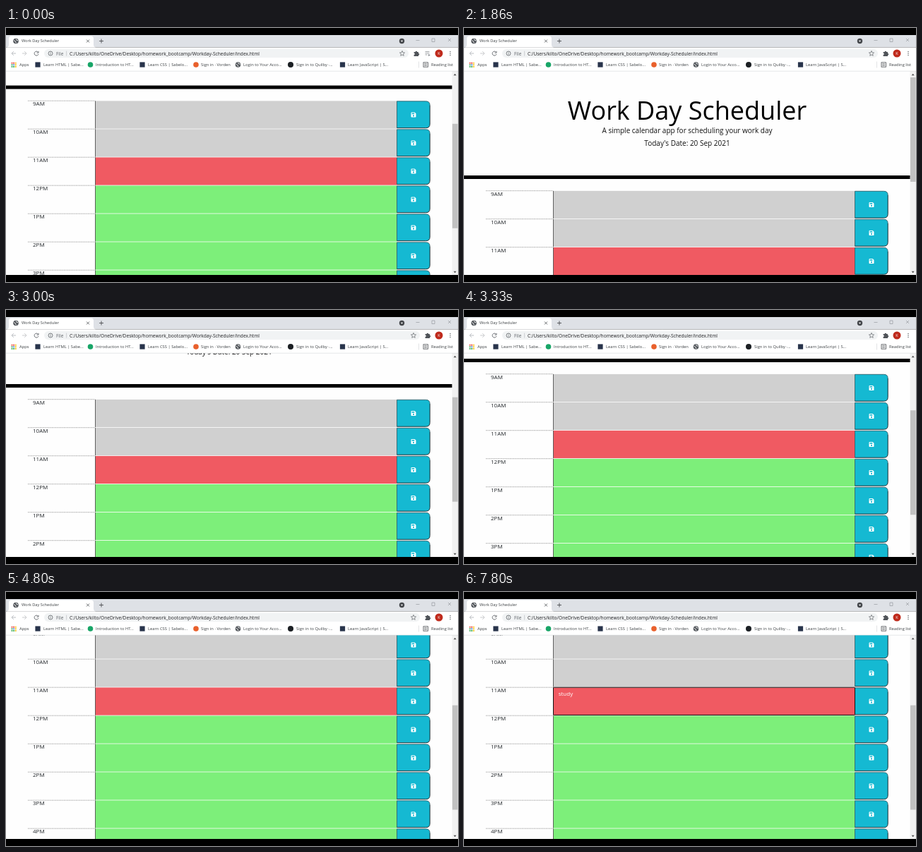
An HTML page that plays this animation: 640 by 360 pixels, repeating every 8 s.

```html
<!DOCTYPE html>
<html lang="en">
<head>
<meta charset="utf-8">
<title>Work Day Scheduler</title>
<style>
  html, body { margin: 0; width: 100%; height: 100%; overflow: hidden; background: #000; }
  svg { display: block; width: 640px; height: 360px; font-family: "Open Sans", "Noto Sans", sans-serif; }
  text { white-space: pre; }
</style>
</head>
<body>
<svg id="stage" viewBox="0 0 640 360"></svg>
<script>
const LOOP = 8000;
const FIRST_ROW = 230.5, ROW = 40;
const HOURS = ['9AM', '10AM', '11AM', '12PM', '1PM', '2PM', '3PM', '4PM', '5PM'];
const CURRENT = 2;

// [start ms, value], each held until the next
const SCROLL = [
  [0, 127.5], [530, 123], [730, 117], [830, 109], [930, 101.5], [1130, 74], [1260, 48],
  [1530, 16], [1600, 0], [2330, 14], [2430, 34], [2530, 52], [2800, 74], [2860, 90],
  [3000, 104], [3060, 108], [3260, 124], [3330, 140], [3400, 153], [3730, 166],
  [3800, 173], [4060, 174.5], [4130, 175.5]
];
const TYPED = [[0, ''], [5800, 's'], [6000, 'st'], [6400, 'stu'], [6800, 'stud'], [7000, 'study']];
const CARET = [[0, 0], [5000, 1], [5600, 0], [5800, 1], [7460, 0]];
const FOCUS = [[0, 0], [5000, 1]];
const MEDIA = [[0, 1], [1860, 0]];
const MEDIA_WIDTH = 16;

const stage = document.getElementById('stage');

function add(parent, tag, attrs = {}, content) {
  const node = document.createElementNS('http://www.w3.org/2000/svg', tag);
  for (const key in attrs) node.setAttribute(key, attrs[key]);
  if (content !== undefined) node.textContent = content;
  return parent.appendChild(node);
}
const rect = (p, x, y, width, height, fill, more) => add(p, 'rect', { x, y, width, height, fill, ...more });
const disc = (p, cx, cy, r, fill, more) => add(p, 'circle', { cx, cy, r, fill, ...more });
const line = (p, d, stroke = '#5f6368', width = 0.9, more) =>
  add(p, 'path', { d, stroke, 'stroke-width': width, fill: 'none', ...more });
const label = (p, x, y, size, str, fill = '#212529', more) =>
  add(p, 'text', { x, y, 'font-size': size, fill, ...more }, str);

function globe(p, x, y) {
  disc(p, x, y, 3.8, '#55595e');
  line(p, `M${x - 2.8} ${y - 1}l2 1.4l1.2 2.4M${x + 0.2} ${y - 3}l.6 1.6l2.2 .6`, '#fff', 0.9);
}

function disk(p, x, y) {
  add(p, 'path', {
    d: `M${x - 3.5} ${y - 2.7}q0-.8 .8-.8h4.4l1.8 1.8v4.4q0 .8-.8 .8h-5.4q-.8 0-.8-.8z`, fill: '#fff'
  });
  rect(p, x - 2.4, y - 2.5, 3.7, 1.7, '#15b9d2');
  disc(p, x, y + 1.4, 1.1, '#15b9d2');
}

function buildRow(page, hour, i) {
  const g = add(page, 'g', { transform: `translate(0 ${FIRST_ROW + i * ROW})` });
  const fill = i < CURRENT ? '#d0d0d0' : i === CURRENT ? '#f05a62' : '#7def7a';
  line(g, 'M31 0.2H126', '#777', 0.7, { 'stroke-dasharray': '1 0.7' });
  label(g, 38, 7.4, 8, hour);
  rect(g, 126, 0.4, 427.5, 39.2, fill);
  line(g, 'M126.5 0.4V39.6', '#555', 0.9);
  add(g, 'path', {
    d: 'M553.5 0.8H594.5Q600.2 .8 600.2 6.5V33Q600.2 38.7 594.5 38.7H553.5Z', fill: '#15b9d2'
  });
  line(g, 'M553.5 38.7V0.8H594.5Q600.2 .8 600.2 6.5', '#2b555d', 0.8);
  line(g, 'M600.2 6.5V33Q600.2 38.7 594.5 38.7H553.5', '#1c2a2d', 0.95);
  disk(g, 577, 20);
  return g;
}

function buildPage() {
  rect(stage, 0, 61, 640, 289, '#fefefe');
  const page = add(stage, 'g');
  const mid = { 'text-anchor': 'middle' };
  label(page, 316, 129.5, 36, 'Work Day Scheduler', '#000', mid);
  label(page, 316, 149.4, 10, 'A simple calendar app for scheduling your work day', '#111', mid);
  label(page, 316, 167, 10, "Today's Date: 20 Sep 2021", '#111', mid);
  rect(page, 0, 209, 632, 5, '#000');
  const rows = HOURS.map((hour, i) => buildRow(page, hour, i));
  const now = rows[CURRENT];
  const focus = rect(now, 126.5, 0.2, 427, 39.2, 'none', { stroke: '#111', 'stroke-width': 1, rx: 0.8 });
  const entry = label(now, 133.7, 12.2, 8, '', '#fff');
  const caret = rect(now, 134, 5.2, 0.6, 8.5, '#fff');
  return { page, focus, entry, caret };
}

function buildScrollbar() {
  rect(stage, 631.5, 61, 8.5, 289, '#f1f1f1');
  const thumb = rect(stage, 632, 70, 7.5, 148, '#c1c1c1');
  add(stage, 'path', { d: 'M633.7 67.2h4l-2-2.4zM633.7 344.8h4l-2 2.4z', fill: '#505050' });
  return thumb;
}

function buildTabs() {
  rect(stage, 0, 10, 640, 17.5, '#dee1e6');
  add(stage, 'path', { d: 'M0 27.5Q4 27.5 4 23.5V15Q4 11.5 7.5 11.5H120.5Q124 11.5 124 15V23.5Q124 27.5 128 27.5Z', fill: '#fff' });
  globe(stage, 14, 18.5);
  label(stage, 22, 20.4, 5.65, 'Work Day Scheduler', '#3c4043');
  line(stage, 'M114 16.5l4 4m0-4l-4 4', '#4a4d51', 0.8);
  line(stage, 'M132 18.5h6m-3-3v6', '#4a4d51');
  disc(stage, 560.5, 18.5, 3.7, '#45484c');
  add(stage, 'path', { d: 'M558.8 17.7h3.4l-1.7 2z', fill: '#fff' });
  line(stage, 'M580.5 17.5h5M603 15h4v4.5h-4zM626 15l4 4m0-4l-4 4', '#8c8f94', 0.6);
}

function buildToolbar() {
  rect(stage, 0, 27.5, 640, 17.5, '#fff');
  line(stage, 'M14 36H8m2.8-2.8L8 36l2.8 2.8', '#b4b7bb');
  line(stage, 'M23 36h6m-2.8-2.8L29 36l-2.8 2.8', '#c3c5c8');
  line(stage, 'M45.3 34A3 3 0 1 0 46 37M46 32.8v2.4h-2.5');
  const pill = rect(stage, 54, 30, 516, 12, '#f1f3f4', { rx: 6 });
  disc(stage, 63, 36, 3, 'none', { stroke: '#5f6368', 'stroke-width': 0.8 });
  line(stage, 'M63 35.6v2M63 34v.8', '#5f6368', 0.8);
  label(stage, 71, 38.6, 6.5, 'File', '#5f6368');
  line(stage, 'M85.6 32.6v7', '#b5b8bc', 0.6);
  label(stage, 90, 38.6, 6.63,
    'C:/Users/kilto/OneDrive/Desktop/homework_bootcamp/Workday-Scheduler/index.html', '#202124');
  const tools = add(stage, 'g');
  line(tools, 'M561 32.4l1 2.4 2.6.2-2 1.7.6 2.6-2.2-1.4-2.2 1.4.6-2.6-2-1.7 2.6-.2z', '#5f6368', 0.7);
  add(tools, 'path', {
    d: 'M577.6 34h2a1.3 1.3 0 0 1 2.6 0h1.8v2a1.3 1.3 0 0 1 0 2.6v1.4h-6.4v-2a1.2 1.2 0 0 0 0-2.4z',
    fill: '#505459'
  });
  const media = add(stage, 'g');
  line(media, 'M593.5 33.5h6M593.5 35.7h6M593.5 37.9h3.2', '#8b8e92', 0.8);
  add(media, 'path', { d: 'M598 36.8l2.8 1.6-2.8 1.6z', fill: '#8b8e92' });
  disc(stage, 613, 36, 5.5, '#bf2a1c');
  label(stage, 613, 38, 5.4, 'K', '#fff', { 'text-anchor': 'middle' });
  for (const y of [33.4, 36, 38.6]) disc(stage, 629, y, 0.75, '#5f6368');
  return { pill, tools, media };
}

function buildBookmarks() {
  rect(stage, 0, 45, 640, 16, '#fff');
  line(stage, 'M0 61.2H640', '#d5d7da', 0.6);
  const dots = ['#ea4335', '#ea4335', '#fbbc04', '#34a853', '#4285f4', '#fbbc04', '#34a853', '#34a853', '#fbbc04'];
  dots.forEach((fill, i) => rect(stage, 7.6 + i % 3 * 2.6, 48.8 + Math.floor(i / 3) * 2.6, 1.8, 1.8, fill));
  const square = (x, fill) => rect(stage, x - 3.6, 48.4, 7.2, 7.2, fill);
  for (const x of [45, 193, 476.5]) square(x, '#28344b');
  disc(stage, 119.5, 52, 3.8, '#18a567');
  disc(stage, 269, 52, 3.8, '#e9602c');
  globe(stage, 328.5, 52);
  disc(stage, 403, 52, 4, '#1b1f23');
  const names = [
    [19, 'Apps'], [53, 'Learn HTML | Sabe...'], [127, 'Introduction to HT...'],
    [201, 'Learn CSS | Sabelo...'], [276, 'Sign in · Vorden'], [336, 'Login to Your Acco...'],
    [411, 'Sign in to Quilby ·...'], [484, 'Learn JavaScript | S...'], [602, 'Reading list']
  ];
  for (const [x, str] of names) label(stage, x, 54.1, 5.8, str, '#3c4043');
  line(stage, 'M584.5 47.5v9', '#d0d2d5', 0.6);
  rect(stage, 591, 48.8, 6.4, 6.4, 'none', { stroke: '#4a4d51', 'stroke-width': 0.8 });
  line(stage, 'M592.3 50.6h3.8M592.3 52h3.8M592.3 53.4h3.8', '#4a4d51', 0.6);
}

const view = buildPage();
const thumb = buildScrollbar();
buildTabs();
const bar = buildToolbar();
buildBookmarks();
rect(stage, 0, 0, 640, 10, '#000');
rect(stage, 0, 350, 640, 10, '#000');

const at = (steps, t) => steps.reduce((value, [start, next]) => t >= start ? next : value, steps[0][1]);

function draw() {
  const t = performance.now() % LOOP;
  const scroll = at(SCROLL, t);
  const typed = at(TYPED, t);
  const media = at(MEDIA, t);
  const shift = media ? 0 : MEDIA_WIDTH;
  view.page.setAttribute('transform', `translate(0 ${-scroll})`);
  thumb.setAttribute('y', 70 + scroll * 0.516);
  bar.media.setAttribute('opacity', media);
  bar.tools.setAttribute('transform', `translate(${shift} 0)`);
  bar.pill.setAttribute('width', 516 + shift);
  view.focus.setAttribute('opacity', at(FOCUS, t));
  if (view.entry.textContent !== typed) view.entry.textContent = typed;
  view.caret.setAttribute('x', 134 + (typed ? view.entry.getComputedTextLength() : 0));
  view.caret.setAttribute('opacity', at(CARET, t));
  requestAnimationFrame(draw);
}
draw();
</script>
</body>
</html>
```
